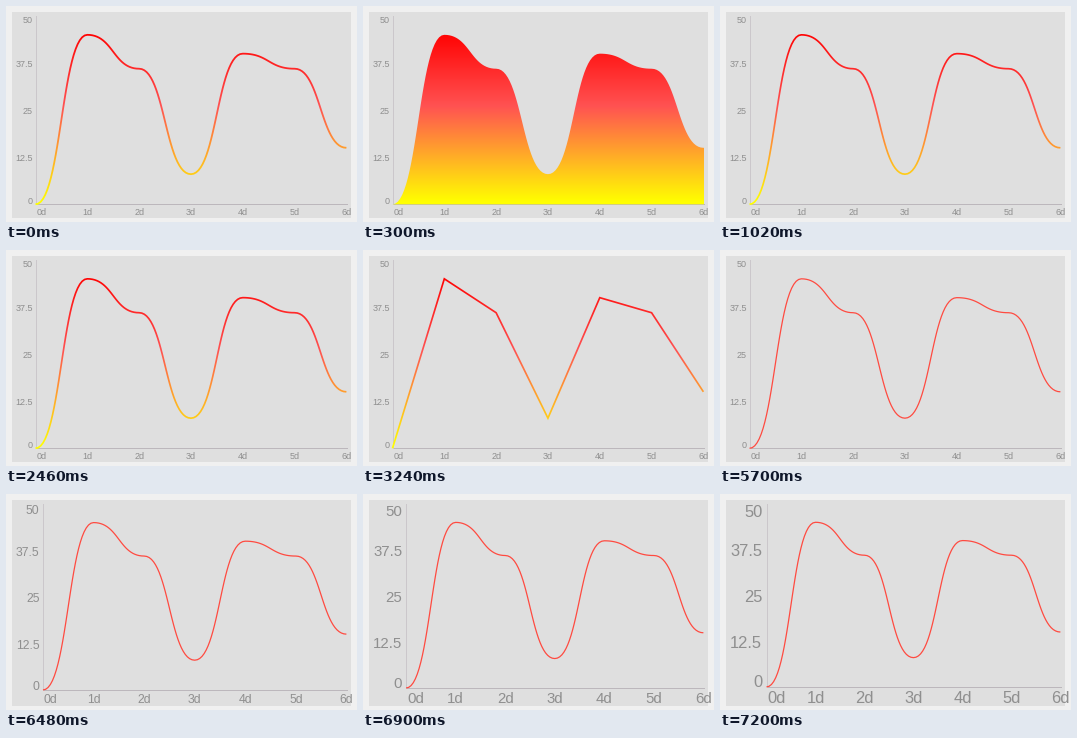
A matplotlib script for the animation above (8 s loop, 351 by 216 pixels).

```python
import numpy as np
import matplotlib.pyplot as plt
from matplotlib.animation import FuncAnimation
from matplotlib.patches import Rectangle
from matplotlib.path import Path

W, H, DPI = 351, 216, 100
LOOP, STEP = 8000, 20
VALUES = np.array([0, 45, 36, 8, 40, 36, 15])
TICKS = [0, 12.5, 25, 37.5, 50]
TOP, RIGHT = 10, 340.4
SMALL = 9.0

# start time, shape, filled, palette, line width
STATES = [
    (0, "smooth", False, "warm", 1.8),
    (240, "smooth", True, "warm", 0),
    (1020, "smooth", False, "warm", 1.7),
    (1800, "linear", False, "warm", 1.7),
    (2460, "smooth", False, "warm", 1.7),
    (3060, "linear", False, "warm", 1.7),
    (3840, "smooth", False, "warm", 1.7),
    (4800, "smooth", False, "dark", 1.7),
    (5640, "smooth", False, "red", 1.25),
]

# colour stops as (y, rgb), from top to bottom
PALETTES = {
    "warm": [(25, (255, 0, 0)), (100, (255, 82, 82)), (196, (255, 255, 0))],
    "dark": [(25, (250, 76, 76)), (198, (98, 18, 40))],
    "red": [(0, (255, 74, 64)), (H, (255, 74, 64))],
}


def gradient(stops):
    ys, colors = zip(*stops)
    rows = np.arange(H) + 0.5
    rgb = np.array(colors)
    return np.stack([np.interp(rows, ys, rgb[:, c]) for c in range(3)], axis=1)[:, None] / 255


def layout(size):
    """Left axis x and bottom axis y for a label size in pixels."""
    grow = size - SMALL
    return 29.5 + 2.27 * grow, 198.3 - 0.72 * grow


def to_y(value, base):
    return base - value * (base - TOP) / 50


def curve(shape, size):
    left, base = layout(size)
    xs = np.linspace(left, RIGHT, len(VALUES))
    ys = to_y(VALUES, base)
    if shape == "linear":
        return np.column_stack([xs, ys])
    # Bezier pieces with horizontal handles reaching to the middle
    t = np.linspace(0, 1, 28, endpoint=False)
    along = 1.5 * t * (1 - t) + t ** 3
    rise = 3 * t ** 2 - 2 * t ** 3
    px = xs[:-1, None] + np.diff(xs)[:, None] * along
    py = ys[:-1, None] + np.diff(ys)[:, None] * rise
    return np.column_stack([np.append(px, xs[-1]), np.append(py, ys[-1])])


def stroke_outline(points, width):
    """Closed outline of a polyline with mitred joins."""
    d = np.diff(points, axis=0)
    normals = np.column_stack([-d[:, 1], d[:, 0]]) / np.hypot(*d.T)[:, None]
    before = np.vstack([normals[:1], normals])
    after = np.vstack([normals, normals[-1:]])
    miter = (before + after) / (1 + (before * after).sum(axis=1))[:, None]
    offset = miter * width / 2
    return np.vstack([points + offset, (points - offset)[::-1]])


def closed_path(points):
    return Path(np.vstack([points, points[:1]]), closed=True)


def label_size(time):
    if time < 6180:
        return SMALL
    if time < 6360:
        return 9.8
    time = min(time // 60 * 60, 7200)
    return float(np.interp(time, [6360, 6480, 6900, 7200], [10.8, 12.3, 15.0, 16.5]))


fig = plt.figure(figsize=(W / DPI, H / DPI), dpi=DPI, facecolor="#f0f0f0")
ax = fig.add_axes([0, 0, 1, 1])
ax.axis("off")
ax.add_patch(Rectangle((6, 6), 338.5, 206, color="#dfdfdf", lw=0))

x_axis, = ax.plot([], [], color="#bcb7bc", lw=0.72, zorder=2)
y_axis, = ax.plot([], [], color="#cbc7cb", lw=0.72, zorder=2)
ramps = {name: gradient(stops) for name, stops in PALETTES.items()}
ink = ax.imshow(ramps["warm"], extent=(0, W, H, 0), aspect="auto",
                interpolation="nearest", zorder=3)
ax.set_xlim(0, W)
ax.set_ylim(H, 0)

window = Rectangle((0, 0), 341, H, transform=ax.transData)
style = dict(color="#8f8f8f", family="Liberation Sans", va="baseline", zorder=4)
y_labels = [ax.text(0, 0, f"{v:g}", ha="right", **style) for v in TICKS]
x_labels = [ax.text(0, 0, f"{i}d", ha="center" if i else "left", **style)
            for i in range(len(VALUES))]
x_labels[-1].set_clip_path(window)

paths = {}


def shape_path(shape, filled, width, size):
    key = shape, filled, width, size
    if key not in paths:
        points = curve(shape, size)
        if filled:
            base = layout(size)[1]
            outline = np.vstack([points, [RIGHT + 0.6, points[-1, 1]],
                                 [RIGHT + 0.6, base], [points[0, 0], base]])
        else:
            outline = stroke_outline(points, width)
        paths[key] = closed_path(outline)
    return paths[key]


def place_labels(size):
    left, base = layout(size)
    half = 0.36 * size
    for value, label in zip(TICKS, y_labels):
        middle = np.clip(to_y(value, base) + 0.7, TOP + half + 0.9, base - half - 0.2)
        label.set_position((left - 0.7 - 0.22 * size, middle + half))
    for x, label in zip(np.linspace(left, RIGHT, len(VALUES)), x_labels):
        label.set_position((x, 208.9))
    x_labels[0].set_x(left + 0.8)
    for label in y_labels + x_labels:
        label.set_fontsize(size * 72 / DPI)
    x_axis.set_data([left, 341], [base, base])
    y_axis.set_data([left, left], [TOP, base])


def update(frame):
    time = frame * STEP
    _, shape, filled, palette, width = [s for s in STATES if s[0] <= time][-1]
    size = label_size(time)
    place_labels(size)
    ink.set_data(ramps[palette])
    ink.set_clip_path(shape_path(shape, filled, width, size), ax.transData)
    return [ink, x_axis, y_axis, *y_labels, *x_labels]


anim = FuncAnimation(fig, update, frames=LOOP // STEP, interval=STEP,
                     repeat=True, repeat_delay=0, blit=False)
plt.show()
```
